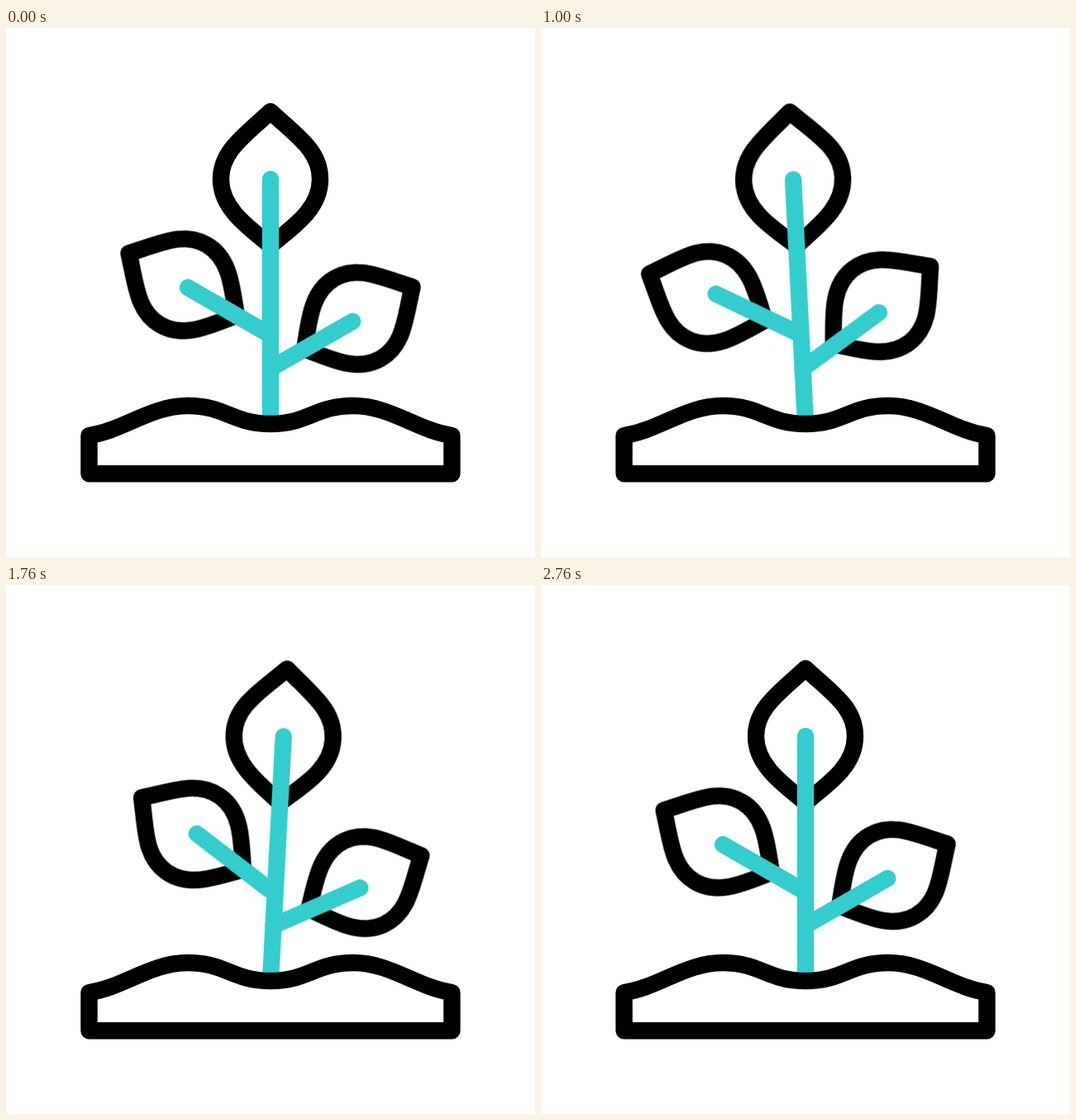
An HTML page that plays this animation: 640x640 px, repeating every 3000 ms.

```html
<!DOCTYPE html>
<html lang="en">
<head>
<meta charset="utf-8">
<title>Seedling in the wind</title>
<style>
  html, body { margin: 0; width: 100%; height: 100%; overflow: hidden; background: #fff; }
  svg { display: block; width: 100%; height: 100%; }
  path { fill: none; stroke: #000; stroke-width: 20.4; stroke-linecap: round; stroke-linejoin: round; }
  .teal { stroke: #33cdcd; }

  /* --a, --b, --c: successive extremes of the swing */
  .sway { animation: sway 3s cubic-bezier(.333, 0, .667, 1) infinite; }
  @keyframes sway {
    0%, 5.333% { transform: rotate(0deg); }
    26.667% { transform: rotate(var(--a)); }
    49.333% { transform: rotate(var(--b)); }
    70.667% { transform: rotate(var(--c)); }
    92%, 100% { transform: rotate(0deg); }
  }
  .plant { --a: -5.5deg; --b: 6.9deg; --c: -2.5deg; }
  .left.leaf { --a: -9.2deg; --b: 10.2deg; --c: -9.2deg; }
  .left.twig { --a: -4.7deg; --b: 10.95deg; --c: -4.4deg; }
  .right.leaf { --a: -10.1deg; --b: 9.8deg; --c: -10.5deg; }
  .right.twig { --a: -7.4deg; --b: 10.8deg; --c: -7.6deg; }

  /* --tail: where the gust's tail settles, in percent of its path */
  .gust { animation: gust 3s linear infinite; }
  @keyframes gust {
    0%, 6.6% { stroke-dasharray: 0 300; stroke-dashoffset: 0; opacity: 0; }
    6.667% { stroke-dasharray: 0 300; stroke-dashoffset: 0; opacity: 1; animation-timing-function: ease-in; }
    14% { stroke-dasharray: 40 300; stroke-dashoffset: -10; opacity: 1; animation-timing-function: ease-out; }
    22.667%, 24% { stroke-dasharray: calc(100 - var(--tail)) 300; stroke-dashoffset: calc(0 - var(--tail)); opacity: 1; }
    25.3% { stroke-dasharray: 0 300; stroke-dashoffset: -100; opacity: 1; }
    25.333%, 100% { stroke-dasharray: 0 300; stroke-dashoffset: -100; opacity: 0; }
  }
</style>
</head>
<body>
<svg viewBox="0 0 640 640">
  <defs>
    <path id="side-leaf" d="M0-47.5C28-70 56-89 56-121.5S30-170 0-198C-30-170-56-154-56-121.5S-28-70 0-47.5Z"/>
  </defs>

  <g transform="translate(320 478)">
    <g class="plant sway">
      <path d="M0-215C30-239 60-260 60-295S32-347 0-377C-32-347-60-329-60-295S-30-239 0-215Z"/>
      <g transform="translate(0 -106.5)">
        <g class="left leaf sway"><use href="#side-leaf" transform="rotate(-60)"/></g>
      </g>
      <g transform="translate(0 -66)">
        <g class="right leaf sway"><use href="#side-leaf" transform="rotate(60.1)"/></g>
      </g>
      <g transform="translate(0 -149)">
        <path class="left twig sway teal" d="M-5 39.6L-100-15"/>
      </g>
      <g transform="translate(0 -66)">
        <path class="right twig sway teal" d="M0 0L99.3-57"/>
      </g>
      <path class="teal" d="M0 0V-295"/>
    </g>
  </g>

  <path d="M100.5 493C142 487 175 457 220 457S275 479 320 479S375 457 420 457S498 487 539.5 493V539.2H100.5Z"/>

  <path class="teal gust" style="--tail: 67" pathLength="100" d="M628 62C604 76 583 58 561 53Q545 48 528 56.5"/>
  <path class="teal gust" style="--tail: 79" pathLength="100" d="M628 165C590 176 550 173 514 161L485 151"/>
  <path class="teal gust" style="--tail: 88" pathLength="100" d="M588 290C550 306 510 300 481 284L468 276"/>
</svg>
</body>
</html>
```
